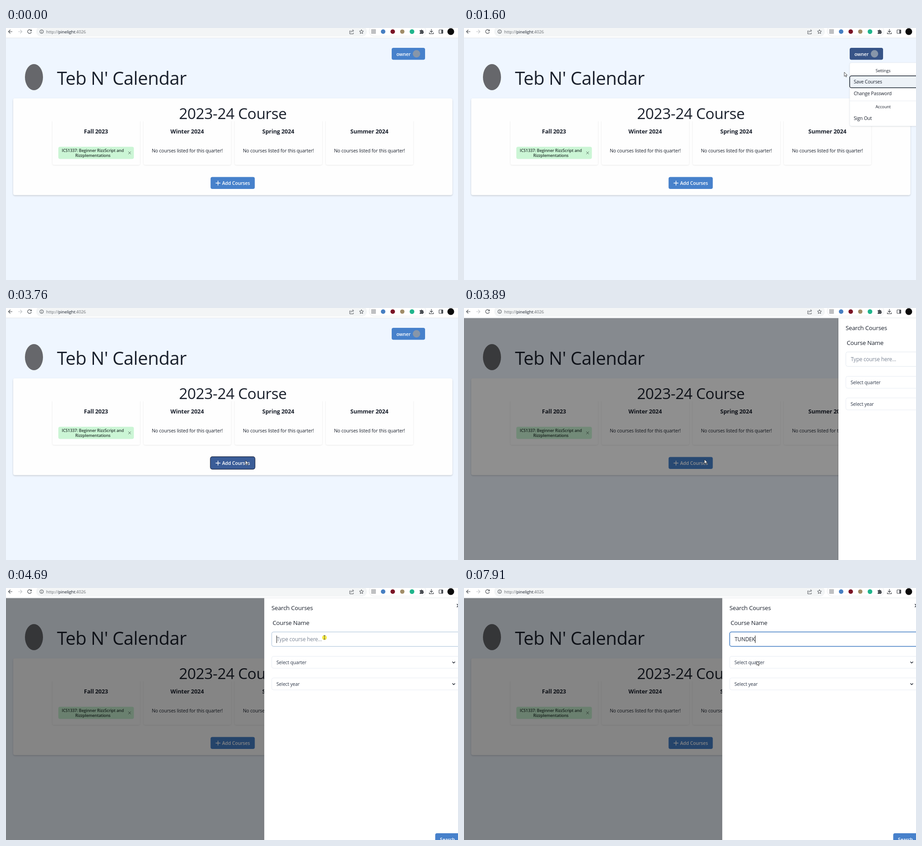
Write an HTML page that moves like this. It is 1002 px wide and 559 px high and loops after 8000 ms.

```html
<!DOCTYPE html>
<html lang="en">
<head>
<meta charset="utf-8">
<title>Course planner</title>
<style>
html, body { margin: 0; width: 100%; height: 100%; overflow: hidden; background: #fff; }
svg { display: block; width: 100vw; height: 100vh; }
text { font-family: "Open Sans", "Noto Sans", sans-serif; letter-spacing: -.013em; white-space: pre; }
</style>
</head>
<body>
<svg id="stage" viewBox="0 0 1002 559" xmlns="http://www.w3.org/2000/svg"></svg>
<script>
const LOOP = 8000, STEP = 134;
const INK = '#1a202c', BLUE = '#4781cb', LINE = '#e2e8f0';
const TYPED = 'TUNDEK';

// Markup helpers
const rect = (x, y, w, h, fill, r = 0, more = '') =>
  `<rect x="${x}" y="${y}" width="${w}" height="${h}" rx="${r}" fill="${fill}" ${more}/>`;
const dot = (x, y, r, fill, more = '') =>
  `<circle cx="${x}" cy="${y}" r="${r}" fill="${fill}" ${more}/>`;
const path = (d, color, w = 1.2, more = '') =>
  `<path d="${d}" fill="none" stroke="${color}" stroke-width="${w}" ${more}/>`;
const text = (x, y, size, s, weight = 400, fill = INK, more = '') =>
  `<text x="${x}" y="${y}" font-size="${(size * .98).toFixed(2)}" font-weight="${weight}" fill="${fill}" ${more}>${s}</text>`;
const mid = (x, y, size, s, weight, fill) =>
  text(x, y, size, s, weight, fill, 'text-anchor="middle"');

function browserBar() {
  const g = '#4b4f54';
  return rect(0, 0, 1002, 22, '#fff') +
    rect(0, 21.5, 1002, 1, '#e4e7ea') +
    rect(67, -4, 733, 23, '#f3f5f6', 11) +
    rect(805, -4, 126, 22, '#fff', 11, 'stroke="#e6e8eb"') +
    path('M14 8H5.5M9.5 4L5.5 8l4 4', g) +
    path('M27 8h8.5M31.5 4l4 4-4 4', '#c3c6c9') +
    path('M55.5 5.3A4.2 4.2 0 1 0 56.2 9M56.4 3.5V6.5H53.4', g) +
    dot(79, 8, 4, 'none', `stroke="${g}"`) + path('M79 7.5v3M79 5.4v1.1', g, 1) +
    text(89, 11.7, 9.7, `<tspan fill="#6a6e73">http://</tspan>pinelight<tspan fill="#6a6e73">:4026</tspan>`) +
    path('M764 6.5h-2v6.5h8v-2.5M764.5 10q.5-4 4.5-4M768 3.5l3 2.5-3 2.5', g, 1) +
    path('M788 3.7l1.3 3 3.2.3-2.4 2.1.7 3.2-2.8-1.7-2.8 1.7.7-3.2-2.4-2.1 3.2-.3z', g, 1) +
    rect(809.5, 2.5, 10.5, 10.5, '#bfc0c2', 1) +
    dot(836, 8, 5, '#477fc2') + dot(857.3, 8, 5, '#7b1426') +
    dot(878.5, 8, 4.8, '#a18d68') + dot(900, 8, 5.2, '#20b58c') +
    `<path d="M917 5h2.500a1.500 1.500 0 1 1 3 0h2.500v2.700a1.500 1.500 0 1 1 0 3V13h-8v-2.600a1.400 1.400 0 1 0 0-2.800z" fill="${g}"/>` +
    path('M943 2.5v7M939.8 6.5l3.2 3.2 3.2-3.2M938.5 10v2.7h9V10', g, 1.3) +
    rect(960, 4, 8.5, 8, 'none', 1, `stroke="${g}" stroke-width="1.2"`) + rect(965, 4, 3.5, 8, g) +
    dot(986, 8, 7.5, '#0b0b0b');
}

function quarter(name, i) {
  const x = 103 + i * 202, c = x + 97;
  const card = rect(x, 200, 194, 103.5, '#fefefe', 4, 'filter="url(#soft)"') +
    rect(x - 2, 196, 198, 11, '#fefefe') + mid(c - .5, 233.8, 13, name, 700);
  if (i) return card + mid(c - .2, 276, 10.6, 'No courses listed for this quarter!');
  return card + rect(116, 263.5, 167.5, 27, '#cbf5d5', 4) +
    mid(192.5, 275.2, 9.2, 'ICS1337: Beginner RizzScript and', 600, '#283a32') +
    mid(192.5, 286.2, 9.2, 'Rizzplementations', 600, '#283a32') +
    path('M271 274l6 6M277 274l-6 6', '#60786a', 1);
}

function page() {
  return rect(0, 22, 1002, 537, '#eff6ff') +
    `<ellipse cx="62" cy="109" rx="20" ry="29" fill="#66676b"/>` +
    text(113, 125.5, 41, "Teb N' Calendar") +
    rect(855, 44, 74, 26.5, BLUE, 4, 'id="userBtn"') +
    text(865.5, 61.5, 10.7, 'owner', 600, '#fff') + dot(910, 57.3, 8.2, '#8796a9') +
    rect(16, 156, 973.5, 214.5, '#fefefe', 4, 'filter="url(#lift)"') +
    ['Fall 2023', 'Winter 2024', 'Spring 2024', 'Summer 2024'].map(quarter).join('') +
    mid(502.8, 202, 34.2, '2023-24 Course') +
    rect(453, 329.9, 99, 27.7, '#14203c', 4.5, 'id="addRing" stroke="#14203c" stroke-width="1.2"') +
    rect(453.5, 330.5, 98, 26.5, BLUE, 4, 'id="addBtn"') +
    path('M470 338.7v10.6M464.7 344h10.6', '#fff', 1.4) +
    text(479, 348, 10.7, 'Add Courses', 600, '#fff');
}

function menu() {
  return `<g id="menu">` +
    rect(855, 77, 180, 141.5, '#fff', 4, `stroke="${LINE}" stroke-width=".7" filter="url(#soft)"`) +
    `<rect id="focus" x="855" y="106" width="180" height="26.5" fill="#edf2f7"/>` +
    mid(929.5, 98, 9.4, 'Settings', 500) +
    text(864, 123.8, 10.7, 'Save Courses', 500) +
    text(864, 149.2, 10.7, 'Change Password', 500) +
    rect(855, 162, 180, .8, LINE) +
    mid(929.5, 178.8, 9.4, 'Account', 500) +
    text(864, 204.8, 10.7, 'Sign Out', 500) + `</g>`;
}

// Laid out with the panel's left edge at x = 0
function drawer() {
  const select = (y, label) =>
    rect(16.5, y, 460, 26.5, '#fff', 4, `stroke="${LINE}" stroke-width=".8"`) +
    text(27, y + 17.7, 10.7, label, 400, '#2d3748') +
    path(`M417 ${y + 12}l3 3 3-3`, INK, 1.4);
  return `<g id="drawer">` +
    rect(0, 22, 600, 560, '#fff', 0, 'filter="url(#lift)"') +
    text(16, 48.5, 13.4, 'Search Courses', 500) +
    path('M427 35.5l7 7M434 35.5l-7 7', INK, 1.4) +
    text(18.5, 82.2, 13.4, 'Course Name', 500) +
    rect(16.5, 97.5, 460, 32, '#fff', 4, 'id="field"') +
    text(27.5, 118.2, 12, '', 400, INK, 'id="entry"') +
    rect(27, 105.5, 1, 16.5, '#111', 0, 'id="caret"') +
    select(151.5, 'Select quarter') + select(199.5, 'Select year') +
    rect(379, 544, 90, 30, BLUE, 4) + text(389.5, 562, 10.7, 'Search', 600, '#fff') + `</g>`;
}

const pointers = `<g id="pointer">
  <path id="arrow" d="M0 0V9.300L2.200 7.300 3.800 10.700 5.200 10 3.700 6.800H6.600Z" fill="#fff" stroke="#222" stroke-width=".8" stroke-linejoin="round"/>
  <g id="beam">${dot(0, 1, 5.2, '#f7ec45', 'id="press"')}${path('M-2-3.5H2M0-3.5V4.5M-2 4.5H2', '#444', .9)}</g></g>`;

const stage = document.getElementById('stage');
stage.innerHTML = `<defs>
  <filter id="soft" x="-10%" y="-10%" width="120%" height="125%"><feDropShadow dx="0" dy=".7" stdDeviation=".9" flood-opacity=".13"/></filter>
  <filter id="lift" x="-5%" y="-5%" width="110%" height="115%"><feDropShadow dx="0" dy="1.5" stdDeviation="1.6" flood-opacity=".2"/></filter></defs>` +
  page() + menu() + rect(0, 22, 1002, 537, '#000', 0, 'id="shade"') + drawer() + browserBar() + pointers;

const el = {};
stage.querySelectorAll('[id]').forEach(n => el[n.id] = n);
const set = (node, attrs) => { for (const k in attrs) node.setAttribute(k, attrs[k]); };
const show = (node, on) => set(node, { display: on ? 'inline' : 'none' });

// Pointer route: time, x, y
const route = [
  [134, 694, 488], [1072, 946, 76], [1206, 905, 57], [1474, 893, 57], [1608, 843, 98],
  [1742, 794, 121], [1876, 880, 118], [2144, 900, 198], [2680, 882, 223],
  [3216, 521, 322], [3752, 531, 338], [3886, 533, 336], [4154, 600, 250],
  [4556, 711, 112], [4690, 706, 109], [7370, 706, 109], [7504, 690, 118], [7906, 649, 162]
];

function pointerAt(t) {
  const i = route.findIndex(p => p[0] >= t);
  if (i < 0) return route[route.length - 1].slice(1);
  if (!i) return route[0].slice(1);
  const [a, b] = [route[i - 1], route[i]];
  const u = (t - a[0]) / (b[0] - a[0]), e = u * u * (3 - 2 * u);
  return [a[1] + (b[1] - a[1]) * e, a[2] + (b[2] - a[2]) * e];
}

const between = (t, a, b) => t >= a && t < b;

function draw(ms) {
  const t = Math.floor((ms + 8) / STEP) * STEP;
  const [px, py] = pointerAt(t);
  const drawerOpen = t >= 3880, menuOpen = between(t, 1470, 2810);

  const overUser = between(t, 1200, 1470);
  set(el.userBtn, { fill: menuOpen ? '#375487' : overUser ? '#3f6cb0' : BLUE });

  show(el.menu, menuOpen);
  const scale = t < 1600 ? .93 : t < 1740 ? .993 : 1;
  set(el.menu, {
    transform: `translate(855 77) scale(${scale}) translate(-855 -77)`,
    opacity: t < 1600 ? .65 : 1
  });
  const row = t < 1940 ? 106.5 : t < 2080 ? 132.5 : 188;
  show(el.focus, t < 2400);
  set(el.focus, { y: row, rx: t < 1870 ? 4 : 0, stroke: t < 1870 ? '#1b2431' : 'none', 'stroke-width': 1.5 });

  const pressed = between(t, 3740, 3880), overAdd = between(t, 3480, 3740);
  set(el.addBtn, { fill: pressed ? '#3b5d98' : overAdd ? '#3f6cb0' : BLUE });
  show(el.addRing, pressed);

  show(el.shade, drawerOpen);
  set(el.shade, { opacity: t < 4000 ? .44 : .48 });
  show(el.drawer, drawerOpen);
  const slide = t < 4550 ? 257.5 * Math.pow(.3, (t - 3886) / STEP) : 0;
  set(el.drawer, { transform: `translate(${(572.5 + slide).toFixed(2)} 0)` });

  const focused = t >= 4810, clicked = t >= 4680;
  set(el.field, {
    stroke: focused ? '#3d79c2' : clicked ? '#a6bfd8' : LINE,
    'stroke-width': focused ? 1.5 : 1
  });
  const count = ms < 6535 ? 0 : ms < 6690 ? 2 : ms < 6835 ? 4 : TYPED.length;
  const entry = count ? TYPED.slice(0, count) : 'Type course here...';
  if (el.entry.textContent !== entry) el.entry.textContent = entry;
  set(el.entry, { fill: count ? INK : '#7b8595' });
  const dark = between(ms, 5235, 5765) || between(ms, 6225, 6535) || between(ms, 7465, 7900);
  show(el.caret, clicked && !dark);
  set(el.caret, { x: 27 + (count ? el.entry.getComputedTextLength() + .3 : 0) });

  show(el.pointer, between(t, 130, 4810) || ms >= 7465);
  set(el.pointer, { transform: `translate(${px.toFixed(1)} ${py.toFixed(1)})` });
  const beam = drawerOpen && between(py, 97, 130);
  show(el.arrow, !beam);
  show(el.beam, beam);
  show(el.press, between(t, 4680, 4810));
}

const start = performance.now();
function tick() {
  draw((performance.now() - start) % LOOP);
  requestAnimationFrame(tick);
}
tick();
</script>
</body>
</html>
```
